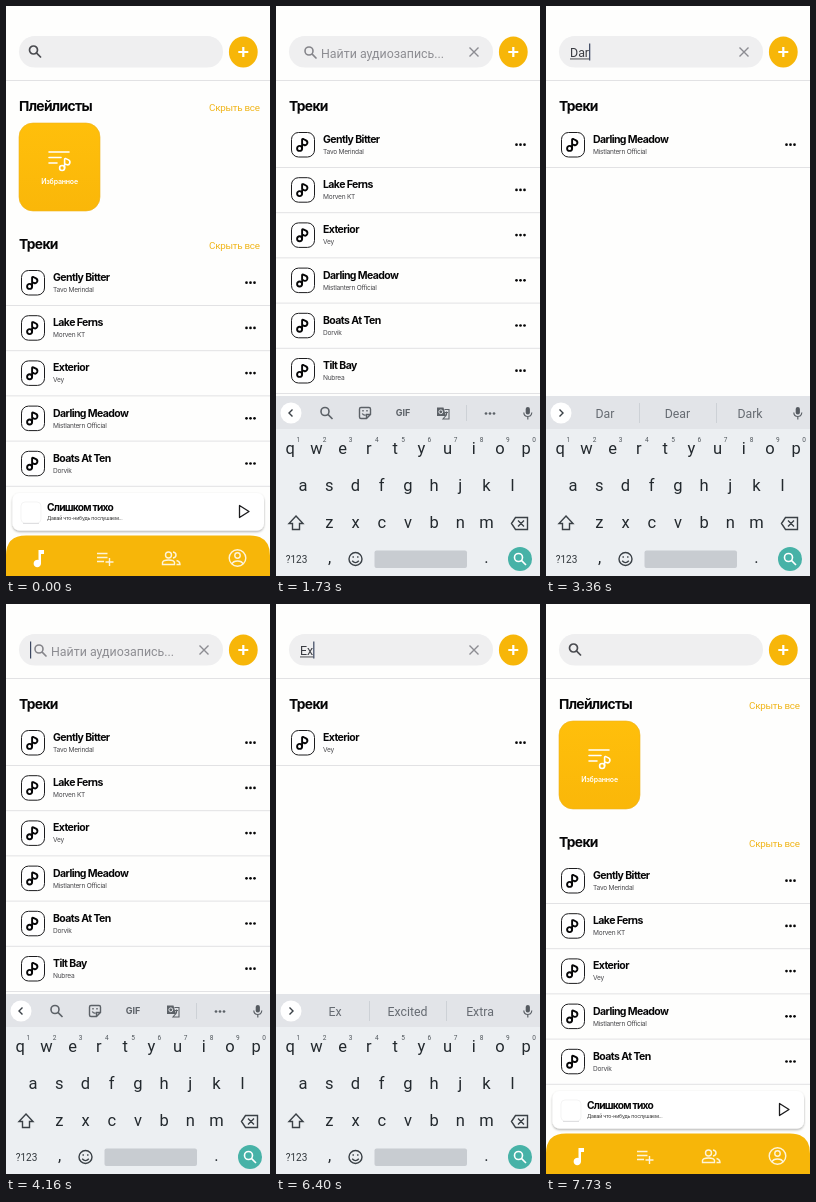
Write an HTML page that moves like this. It is 264x570 px and loops after 8800 ms.

```html
<!DOCTYPE html>
<html lang="ru">
<head>
<meta charset="utf-8">
<title>Поиск треков</title>
<style>
  html, body { margin: 0; width: 100%; height: 100%; overflow: hidden; background: #fefefd; }
  svg { display: block; width: 100vw; height: 100vh; }
  text { font-family: Inter, "Open Sans", sans-serif; fill: #060607; white-space: pre; }
  .head { font-size: 13.8px; font-weight: 650; letter-spacing: -.65px; }
  .title { font-size: 10.5px; font-weight: 650; letter-spacing: -.58px; }
  .now { font-size: 10.2px; font-weight: 650; letter-spacing: -.75px; }
  .artist { font-size: 6.6px; letter-spacing: -.25px; fill: #48484c; }
  .tiny { font-size: 5.2px; letter-spacing: -.2px; fill: #333; }
  .album { font-size: 7px; font-weight: 600; letter-spacing: -.2px; fill: #fff; text-anchor: middle; }
  .gif { font-size: 9px; font-weight: 700; fill: #5c6167; text-anchor: middle; }
  .link, .field, .key, .hint, .sup, .small { font-family: Roboto, "Noto Sans", sans-serif; }
  .link { font-size: 9.8px; letter-spacing: -.25px; fill: #f0b51a; }
  .field { font-size: 12.4px; fill: #3a3c42; }
  .key { font-size: 16.5px; fill: #23292e; text-anchor: middle; }
  .sup { font-size: 6.5px; fill: #50565c; text-anchor: middle; }
  .hint { font-size: 12.3px; fill: #666b72; text-anchor: middle; }
  .small { font-size: 10px; fill: #30363b; text-anchor: middle; }
  .line { stroke: #e2e2e4; stroke-width: 1; }
  .ico { fill: none; stroke: #5c6167; stroke-width: 1.4; }
  .dark { stroke: #3a4046; }
  .white { fill: none; stroke: #fff; stroke-width: 1.4; }
</style>
</head>
<body>
<svg viewBox="0 0 264 570" preserveAspectRatio="none">
  <defs>
    <linearGradient id="gold" x2="0" y2="1">
      <stop stop-color="#ffbf0b"/><stop offset="1" stop-color="#fab709"/>
    </linearGradient>
    <filter id="soft" x="-20%" y="-30%" width="140%" height="170%">
      <feDropShadow dx="0" dy="1.3" stdDeviation="1.2" flood-color="#000" flood-opacity=".33"/>
    </filter>
    <g id="lens" fill="none">
      <circle cx="-1.5" cy="-1.5" r="4"/><path d="M1.4 1.4L6 6"/>
    </g>
    <g id="note" fill="none" stroke-linejoin="round" stroke-linecap="round">
      <circle cx="-2.4" cy="3.5" r="2.5"/>
      <path d="M.1 3.5V-5.2Q.2-6.300 1.300-5.900L4-4.600Q6-3.500 5.200-1.200Q4.200 1 2 .1L.1-.9"/>
    </g>
    <g id="dots"><circle cx="-4" r="1.35"/><circle r="1.35"/><circle cx="4" r="1.35"/></g>
  </defs>
  <rect width="264" height="570" fill="#fefefd"/>

  <g id="list"></g>

  <g id="home">
    <text class="head" x="13" y="105">Плейлисты</text>
    <text class="link" x="203" y="105">Скрыть все</text>
    <text class="link" x="203" y="243">Скрыть все</text>
    <rect x="13" y="117" width="81" height="88" rx="14" fill="url(#gold)" stroke="#efb31c" stroke-width=".6"/>
    <g class="white" stroke-linecap="round" style="stroke-width:1.6">
      <path d="M43 146H63M43 151.5H55M43 157H51"/>
      <use href="#note" x="58.5" y="158.500"/>
    </g>
    <text class="album" x="53.5" y="178">Избранное</text>
  </g>

  <g id="player">
    <rect x="6.5" y="487" width="251.5" height="37.5" rx="7" fill="#fff" filter="url(#soft)"/>
    <rect x="15" y="496" width="20" height="21" rx="4" fill="#fff" stroke="#ececed" stroke-width=".6"/>
    <path d="M17 517.500H33" stroke="#d9d9db" stroke-width=".8"/>
    <text class="now" x="41" y="504.500">Слишком тихо</text>
    <text class="tiny" x="41" y="514">Давай что-нибудь послушаем...</text>
    <path d="M233.5 499.500V511.500L243 505.500Z" fill="none" stroke="#1c1c1e" stroke-width="1.3" stroke-linejoin="round"/>
    <path d="M0 570V549.500Q0 529.500 20 529.500H244Q264 529.500 264 549.500V570Z" fill="#f7b609"/>
    <path d="M32.5 544H38V548H35V557.500A3.700 3.700 0 1 1 32.500 554Z" fill="#fff"/>
    <g class="white" opacity=".85">
      <path d="M91 547.500H101.500M91 551.500H101.500M91 555.500H98M103.500 552V560M99.500 556H107.500"/>
      <circle cx="162.5" cy="549" r="3"/>
      <path d="M156.500 558.500V556.500Q157 554 162.500 554T168.500 556.500V558.500Z"/>
      <path d="M167 546Q170 546.500 170 549T167 552M170.500 554.500Q174 555.500 174 558.500H170.500"/>
      <circle cx="231.5" cy="552" r="8.300"/><circle cx="231.5" cy="549.500" r="2.700"/>
      <path d="M226 558Q227 555 231.500 555T237 558"/>
    </g>
  </g>

  <path class="line" d="M0 74.500H264"/>
  <rect x="13" y="30" width="204" height="31.500" rx="15.750" fill="#efeff0"/>
  <ellipse cx="237.3" cy="46" rx="14.400" ry="15.500" fill="#f7b609"/>
  <path d="M232.300 46H242.300M237.300 41V51" stroke="#fff" stroke-width="2.200"/>
  <use id="homeLens" href="#lens" x="29" y="45.500" stroke="#4a4b50" stroke-width="1.700"/>
  <g id="search">
    <g id="blank">
      <use href="#lens" x="34.500" y="46.500" stroke="#85858a" stroke-width="1.600"/>
      <text class="field" x="45" y="51.500" style="fill:#8d8d92">Найти аудиозапись...</text>
    </g>
    <text id="query" class="field" x="24" y="50.800"></text>
    <rect id="under" x="24" y="52.500" height=".9" fill="#3a3c42"/>
    <rect id="caret" y="37.500" width="1.200" height="17" fill="#3b4660"/>
    <circle id="ripple" cx="198" cy="46" fill="#d4d4d7"/>
    <path id="cross" d="M193.500 41.500L202.500 50.500M202.500 41.500L193.500 50.500" stroke-width="1.400"/>
  </g>

  <g id="board">
    <rect y="390" width="264" height="180" fill="#eceff2"/>
    <rect y="390" width="264" height="33" fill="#e2e4e8"/>
    <circle cx="15" cy="407" r="10.500" fill="#fff"/>
    <path id="chevron" class="ico dark"/>
    <g id="tools">
      <use href="#lens" x="50.500" y="407" class="ico" style="stroke-width:1.6"/>
      <path class="ico" d="M85 401.500H93Q94.500 401.500 94.500 403V408.500L90.500 412.500H85Q83.500 412.500 83.500 411V403Q83.500 401.500 85 401.500ZM90.500 412V408.500H94M86.300 404.800H87.700M90.300 404.800H91.700M86.300 407.500Q87.500 409.500 89.500 409"/>
      <text class="gif" x="127" y="410.200">GIF</text>
      <path d="M161 401.500H167.500L170 410H161Z" fill="#5c6167"/>
      <path class="ico" style="stroke-width:1.1" d="M168.500 403.500H173V413H167L169.500 410M169 406.500H172M170.500 405.500Q171 409 169.500 410"/>
      <circle cx="164.800" cy="405.800" r="1.900" fill="none" stroke="#e2e4e8"/>
      <path d="M190.500 399V415" stroke="#cdd1d6"/>
      <use href="#dots" x="214" y="407.500" fill="#5c6167"/>
    </g>
    <g id="hints">
      <path d="M93.500 397V417M170.500 397V417" stroke="#cdd1d6"/>
    </g>
    <rect x="249.700" y="401" width="4.200" height="7.500" rx="2.100" fill="#555a60"/>
    <path class="ico" style="stroke-width:1.2" d="M247.800 406.500Q248 410.500 251.800 410.500T255.800 406.500M251.800 410.500V413.500"/>
    <g id="keys"></g>
    <path id="shift" class="ico dark" d="M20 510L27 517.500H23.500V523.500H16.500V517.500H13Z"/>
    <path class="ico dark" d="M235.500 517.500L239.500 511.500H251.500V523.500H239.500ZM242 514.500L248 520.500M248 514.500L242 520.500"/>
    <text class="small" x="20.500" y="557">?123</text>
    <text class="key" x="53.500" y="557">,</text>
    <text class="key" x="210.500" y="557">.</text>
    <g class="ico dark">
      <circle cx="79.500" cy="553" r="6.500"/>
      <path d="M76.200 554.800Q79.500 558.500 82.800 554.800M77.200 550.300V551.800M81.800 550.300V551.800"/>
    </g>
    <rect x="98.500" y="544.500" width="92.500" height="17.500" rx="2" fill="#c8ccd1"/>
    <circle cx="244" cy="553" r="12" fill="#47b2a7"/>
    <use href="#lens" x="244" y="553" stroke="#fff" stroke-width="1.600"/>
  </g>
</svg>
<script>
const LOOP = 8800, OPEN = 980, CLOSE = 7540, PRESS = 7200, ROW = 45.2;
const tracks = [
  ['Gently Bitter', 'Tavo Merindal'],
  ['Lake Ferns', 'Morven KT'],
  ['Exterior', 'Vey'],
  ['Darling Meadow', 'Mistlantern Official'],
  ['Boats At Ten', 'Dorvik'],
  ['Tilt Bay', 'Nubrea']
];
const edits = [
  [OPEN, ''], [2800, 'D'], [3000, 'Da'], [3200, 'Dar'],
  [3740, 'Da'], [3870, 'D'], [3990, ''],
  [5550, 'E'], [6050, 'Ex'], [6430, 'E'], [6490, '']
];
const capsSpans = [[2250, 2800], [4950, 5550]];
const words = {
  D: ['D', 'Do', 'Day'], Da: ['Da', 'Day', 'Dad'], Dar: ['Dar', 'Dear', 'Dark'],
  E: ['E', 'Even', 'Each'], Ex: ['Ex', 'Excited', 'Extra']
};

const $ = id => document.getElementById(id);
const show = (id, on) => $(id).setAttribute('visibility', on ? 'visible' : 'hidden');
const set = (id, attrs) => { for (const k in attrs) $(id).setAttribute(k, attrs[k]); };
const clamp = x => Math.min(1, Math.max(0, x));

$('list').innerHTML = '<text class="head" x="13" y="105">Треки</text>' +
  tracks.map(([title, artist]) => `<g class="row">
    <rect x="15.5" y="126.5" width="23" height="24.5" rx="7" fill="#fff" stroke="#1c1c1e"/>
    <use href="#note" x="26" y="138.9" stroke="#060607" stroke-width="1.9"/>
    <text class="title" x="47" y="137">${title}</text>
    <text class="artist" x="47" y="148">${artist}</text>
    <use href="#dots" x="244.5" y="138.7" fill="#060607"/>
    <path class="line" d="M0 161.5H264"/></g>`).join('');
const rows = [...document.querySelectorAll('.row')];

$('keys').innerHTML = [['qwertyuiop', 14.3, 448], ['asdfghjkl', 27, 484.5], ['zxcvbnm', 53.3, 522]]
  .map(([letters, x, y], r) => [...letters].map((c, i) => {
    const kx = x + 26.2 * i;
    const digit = r ? '' : `<text class="sup" x="${kx + 8}" y="436">${(i + 1) % 10}</text>`;
    return `<text class="key letter" x="${kx}" y="${y}">${c}</text>${digit}`;
  }).join('')).join('');
const letters = [...document.querySelectorAll('.letter')];

$('hints').innerHTML += [59, 131.5, 204].map(x => `<text class="hint" x="${x}" y="411.5"></text>`).join('');
const hints = [...document.querySelectorAll('.hint')];

function drawList(searching, query) {
  set('list', { transform: `translate(0 ${searching ? 0 : 138})` });
  let n = 0;
  rows.forEach((row, i) => {
    const on = tracks[i][0].startsWith(query) && (searching || i < 5);
    row.setAttribute('visibility', on ? 'visible' : 'hidden');
    if (on) row.setAttribute('transform', `translate(0 ${ROW * n++})`);
  });
}

function drawField(t, searching, query, since) {
  $('query').textContent = query;
  const width = query ? $('query').getComputedTextLength() : 0;
  set('under', { width });
  set('caret', { x: 24 + width });
  show('search', searching);
  show('blank', searching && !query);
  show('caret', searching && (t - since) % 1000 < 500);
  const grow = clamp((t - PRESS) / 240);
  set('ripple', { r: 11.5 * (1 - (1 - grow) ** 2), opacity: clamp(grow * 2) });
  set('cross', { stroke: t >= PRESS ? '#232326' : '#8c8c91' });
}

function drawBoard(t, query) {
  const rise = 1 - (1 - clamp((t - OPEN - 20) / 280)) ** 3;
  const fall = clamp((t - CLOSE) / 180) ** 2;
  set('board', { transform: `translate(0 ${180 * (1 - rise + fall)})` });
  show('tools', !query);
  show('hints', query);
  set('chevron', { d: query ? 'M13.5 403.5L17 407L13.5 410.5' : 'M16.5 403.5L13 407L16.5 410.5' });
  hints.forEach((h, i) => h.textContent = query ? words[query][i] : '');
  const caps = capsSpans.some(([a, b]) => t >= a && t < b);
  letters.forEach(k => k.textContent = caps ? k.textContent.toUpperCase() : k.textContent.toLowerCase());
  $('shift').style.fill = caps ? '#3a4046' : 'none';
}

function frame(t) {
  const searching = t >= OPEN && t < CLOSE;
  const [since, query] = edits.filter(e => e[0] <= t).pop() || edits[0];
  show('home', !searching);
  show('homeLens', !searching);
  drawList(searching, query);
  drawField(t, searching, query, since);
  drawBoard(t, query);
}

const start = performance.now();
(function tick() {
  frame((performance.now() - start) % LOOP);
  requestAnimationFrame(tick);
})();
</script>
</body>
</html>
```
